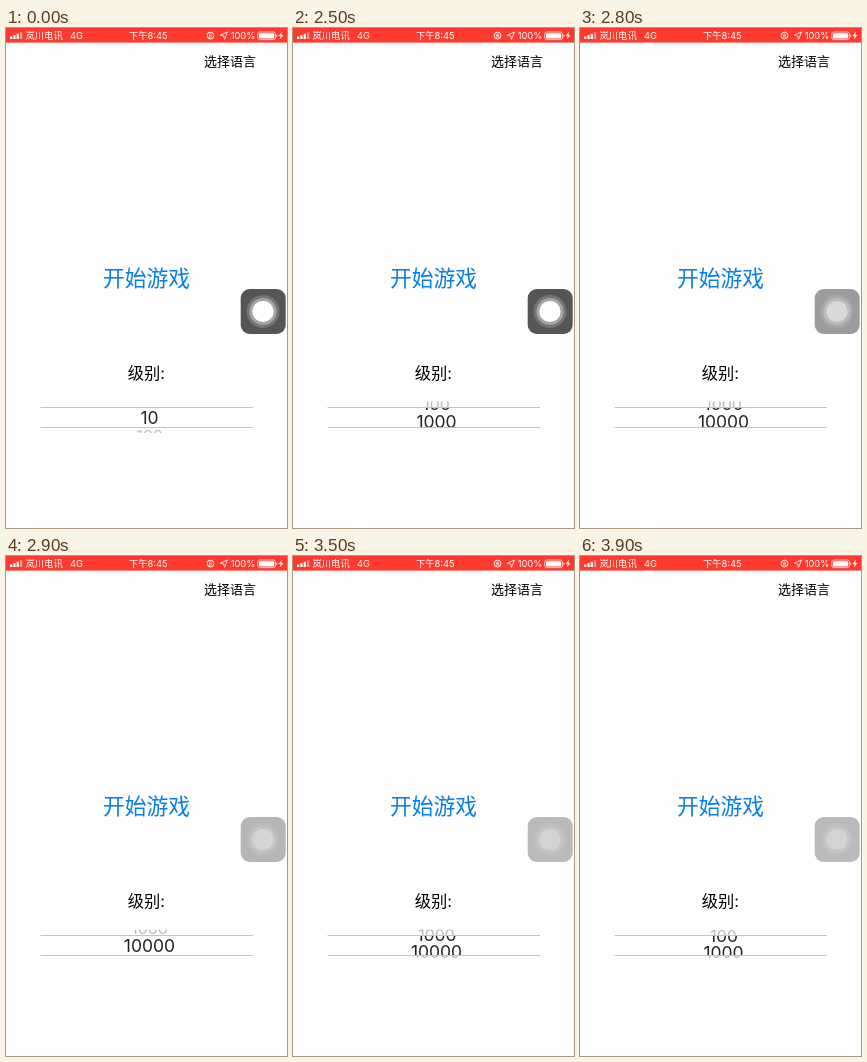
Animation, 281 px wide and 500 px high, one loop 4 s. Source, as an HTML page:

```html
<!DOCTYPE html>
<html lang="zh-CN">
<head>
<meta charset="utf-8">
<style>
  html, body { margin: 0; width: 100%; height: 100%; overflow: hidden; background: #fefefe; }
  svg { display: block; width: 100vw; height: 100vh; }
  text { font-family: Inter, "Noto Sans CJK SC", "Noto Sans CJK", sans-serif; }
  .status { font-size: 9.3px; fill: #fff; }
  .mid { text-anchor: middle; }
  .row { font-size: 17.5px; text-anchor: middle; }
</style>
</head>
<body>
<svg viewBox="0 0 281 500">
  <defs>
    <clipPath id="band"><rect x="35" y="380" width="212" height="19"/></clipPath>
    <clipPath id="edges"><path d="M35 373.5h212v5.5h-212zM35 400h212v5h-212z"/></clipPath>
    <linearGradient id="fade" gradientUnits="userSpaceOnUse" x1="0" y1="373" x2="0" y2="406">
      <stop offset="0" stop-color="#e4e4e4"/>
      <stop offset=".2" stop-color="#a8a8a8"/>
      <stop offset=".8" stop-color="#a8a8a8"/>
      <stop offset="1" stop-color="#dcdcdc"/>
    </linearGradient>
  </defs>

  <rect width="281" height="14.6" fill="#ff3b30"/>
  <g fill="#fff">
    <path d="M4 8.5h2.3v2.5h-2.3zM7.3 7h2.3v4h-2.3zM10.6 5.7h2.3v5.3h-2.3z"/>
    <path d="M13.9 4.2h2.3v6.8h-2.3z" opacity=".45"/>
    <path d="M221.5 4l-3 7.3-.9-3.4-3.4-.8z" fill="none" stroke="#fff" stroke-width=".8"/>
    <rect x="253" y="5.2" width="15.2" height="5.2" rx=".9"/>
    <path d="M270.4 6.4v2.8q1-.4 1-1.4t-1-1.4zM276 3.8l-3.4 4.3h2l-.8 3.4 3.4-4.4h-2z"/>
  </g>
  <g fill="none" stroke="#fff" stroke-width=".9">
    <circle cx="204.5" cy="7.6" r="3.4"/>
    <path d="M203.2 7.3h2.6v1.8h-2.6zM203.7 7.1v-.8q.8-1 1.6 0v.8" stroke-width=".7"/>
    <rect x="251.8" y="4" width="17.6" height="7.6" rx="1.8" stroke-width=".7"/>
  </g>
  <text class="status" x="19.5" y="11">岚川电讯</text>
  <text class="status" x="64" y="11">4G</text>
  <text class="status mid" x="142.3" y="11">下午8:45</text>
  <text class="status mid" x="237" y="11">100%</text>

  <text x="198" y="37.6" font-size="13">选择语言</text>
  <text class="mid" x="140.5" y="258.2" font-size="21.8" fill="#087ee8">开始游戏</text>
  <text class="mid" x="140.3" y="350.7" font-size="16.3">级别:</text>

  <g id="outer" clip-path="url(#edges)"></g>
  <g id="inner" clip-path="url(#band)"></g>
  <path d="M34.5 379.5h212.5M34.5 399.5h212.5" stroke="#c4c4c4"/>

  <g id="button">
    <rect x="234.7" y="261" width="45" height="45" rx="9"/>
    <circle cx="257" cy="283.5" r="16.5"/>
    <circle cx="257" cy="283.5" r="13.6"/>
    <circle cx="257" cy="283.5" r="10.6"/>
  </g>
</svg>
<script>
const LOOP = 4000, STEP = 100, SCROLL_START = 2300;
const LEVELS = ['10', '100', '1000', '10000'];
// Wheel position and button dimming for each step after the scroll starts
const WHEEL = [1, 1.4, 1.8, 2.2, 2.5, 2.78, 3, 3.12, 3.18, 3.18, 3.12, 2.9, 2.65, 2.4, 2.13, 1.87, 1.6];
const DIM = [0, 0, 0, .2, .43, .7, .96, 1];
const SHADES = [[85, 186], [116, 190], [165, 197], [255, 211]];
const $ = id => document.getElementById(id);

function makeRows(parent, fill) {
  return LEVELS.map(level => {
    const row = document.createElementNS('http://www.w3.org/2000/svg', 'text');
    row.setAttribute('class', 'row');
    row.setAttribute('fill', fill);
    row.textContent = level;
    return parent.appendChild(row);
  });
}

const dark = makeRows($('inner'), '#222');
const light = makeRows($('outer'), '#b8b8b8');
const layers = [...$('button').children];

function place(row, offset, zoom) {
  const y = 390 + 17 * offset;
  const squash = zoom * Math.cos(Math.min(1.5, Math.abs(offset) * .6));
  row.setAttribute('transform', `translate(143.5 ${y}) scale(${zoom} ${squash}) translate(0 6.35)`);
  row.style.display = Math.abs(offset) < 1.6 ? '' : 'none';
}

function draw(time) {
  const step = Math.floor((time - SCROLL_START) / STEP);
  const position = step < 0 ? 0 : WHEEL[step];
  const dim = step < 0 ? 0 : DIM[Math.min(step, DIM.length - 1)];
  LEVELS.forEach((_, i) => {
    place(dark[i], i - position, 1);
    place(light[i], i - position, .91);
  });
  layers.forEach((layer, i) => {
    const [from, to] = SHADES[i];
    const mix = i === 3 ? Math.sqrt(dim) : dim;
    const shade = Math.round(from + (to - from) * mix);
    layer.setAttribute('fill', `rgb(${shade},${shade},${shade})`);
  });
}

const start = performance.now();
function tick() {
  draw((performance.now() - start) % LOOP);
  requestAnimationFrame(tick);
}
tick();
</script>
</body>
</html>
```
